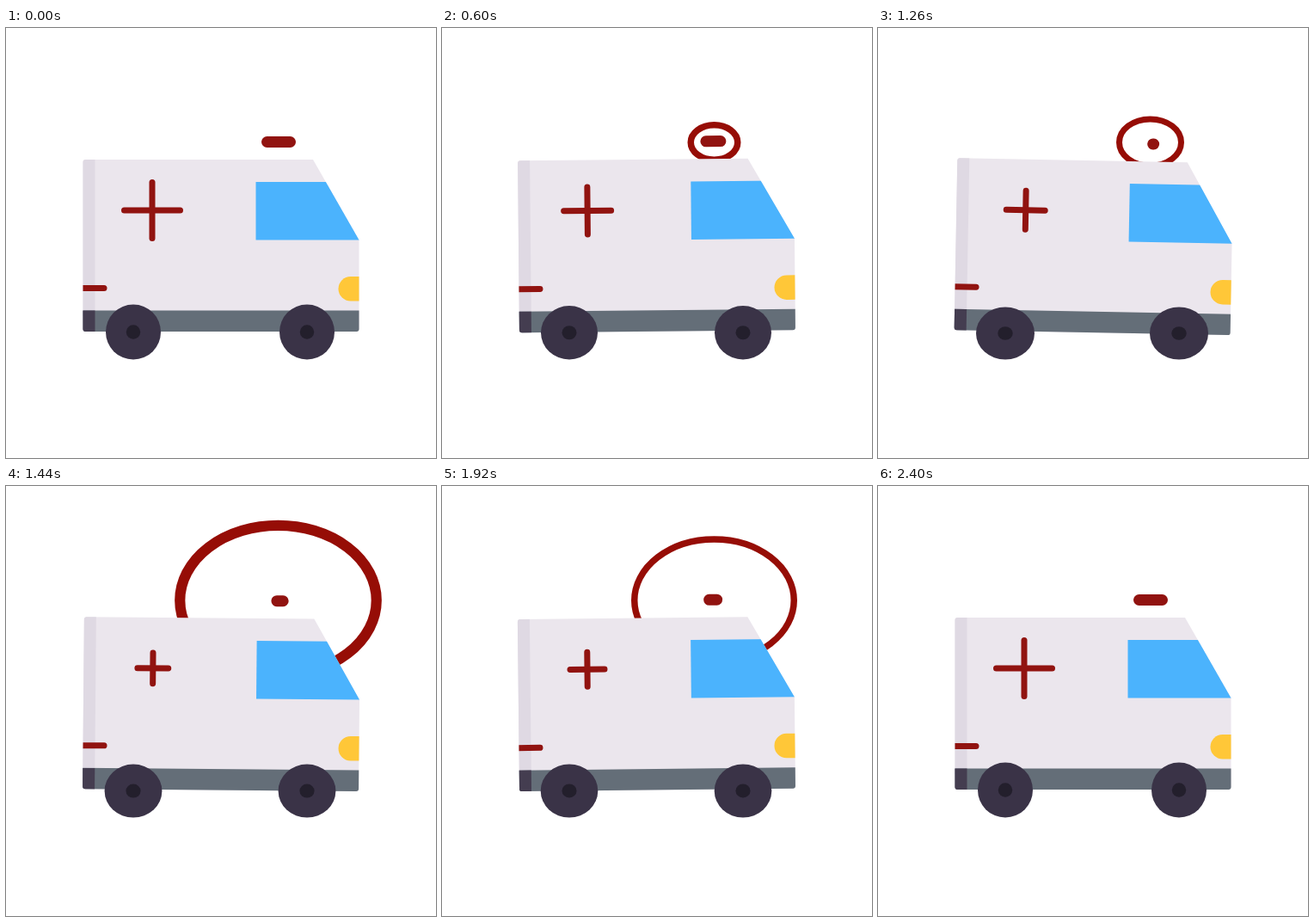
Animation of 500x500 px, one loop 4460 ms. Source, as an HTML page with a canvas:

```html
<!DOCTYPE html>
<html lang="en">
<head>
<meta charset="utf-8">
<title>Ambulance</title>
<style>
html, body { margin: 0; width: 100%; height: 100%; overflow: hidden; background: #fff; }
canvas { display: block; width: 100vw; height: 100vh; }
</style>
</head>
<body>
<canvas id="stage" width="500" height="500"></canvas>
<script>
const ctx = document.getElementById('stage').getContext('2d');
const LOOP = 4460, ACTIVE = 2400, CYCLE = 1200, STEP = 30, SECOND_PULSE = 570;
const RED = '#911310', RING = '#960d06';

// Tracks are [time, value] keys, joined by a smooth curve without overshoot.
const tilt = [[0, 0], [60, 1.05], [180, .35], [270, .6], [390, .75], [450, -.33], [600, -.54], [720, -.62], [900, -.3], [1200, 0]];
const drop = [[0, 0], [60, 1.2], [390, .1], [450, .15], [600, -.2], [720, .4], [1200, 0]];
const squash = [[0, 0], [60, 1], [240, .7], [390, .5], [450, .4], [600, .5], [720, .65], [1200, 0]];
const cross = [[0, 72], [60, 52], [150, 46], [300, 42], [390, 47], [450, 66], [540, 71], [600, 62], [720, 47], [870, 42], [960, 47], [1080, 68], [1200, 72]];
const light = [[0, 40], [60, 14], [390, 28], [450, 30], [540, 36], [600, 30], [720, 22], [960, 28], [1200, 40]];
const ringSize = [[0, 0], [30, 31], [60, 39.5], [150, 96.5], [260, 123], [390, 131.5], [450, 132.5]];
const ringWidth = [[0, 0], [30, 7.5], [60, 7], [150, 7.5], [270, 13], [390, 12.5], [450, 7], [510, 0]];

function slope(keys, i) {
  if (i < 1 || i > keys.length - 2) return 0;
  const rate = j => (keys[j + 1][1] - keys[j][1]) / (keys[j + 1][0] - keys[j][0]);
  const a = rate(i - 1), b = rate(i);
  return a * b <= 0 ? 0 : 2 * a * b / (a + b);
}

function at(keys, t) {
  const last = keys.length - 1;
  if (t >= keys[last][0]) return keys[last][1];
  let i = 0;
  while (t >= keys[i + 1][0]) i++;
  const [t0, v0] = keys[i], [t1, v1] = keys[i + 1];
  const h = t1 - t0, u = (t - t0) / h, w = 1 - u;
  return w * w * ((1 + 2 * u) * v0 + u * h * slope(keys, i)) +
    u * u * ((3 - 2 * u) * v1 - w * h * slope(keys, i + 1));
}

function rect(x, y, w, h, color, radii = 0) {
  ctx.fillStyle = color;
  ctx.beginPath();
  ctx.roundRect(x, y, w, h, radii);
  ctx.fill();
}

function oval(x, y, rx, ry, color) {
  ctx.fillStyle = color;
  ctx.beginPath();
  ctx.ellipse(x, y, rx, ry, 0, 0, 2 * Math.PI);
  ctx.fill();
}

function ring(age) {
  const width = at(ringWidth, age), r = at(ringSize, age);
  if (width < .2) return;
  ctx.strokeStyle = RING;
  ctx.lineWidth = width;
  ctx.beginPath();
  ctx.ellipse(316.5, 133, Math.max(0, r - width / 2), Math.max(0, r * .775 - width / 2), 0, 0, 2 * Math.PI);
  ctx.stroke();
}

function van(t) {
  ctx.save();
  ctx.translate(250, 305 + at(drop, t));
  ctx.rotate(at(tilt, t) * Math.PI / 180);
  ctx.translate(-250, -305);

  const bar = at(light, t);
  rect(317 - bar / 2, 126, bar, 13, RED, Math.min(6.5, bar / 2));

  ctx.save();
  ctx.beginPath();
  ctx.moveTo(93, 153);
  ctx.lineTo(357, 153);
  ctx.lineTo(410.5, 246.5);
  ctx.lineTo(410.5, 350);
  ctx.arcTo(410.5, 353, 407, 353, 3);
  ctx.lineTo(93, 353);
  ctx.arcTo(89.5, 353, 89.5, 350, 3);
  ctx.lineTo(89.5, 156);
  ctx.arcTo(89.5, 153, 93, 153, 3);
  ctx.closePath();
  ctx.clip();
  rect(80, 145, 340, 215, '#ebe6ed');
  rect(80, 145, 23.5, 190, '#dfd9e3');
  rect(80, 328.5, 340, 30, '#646e78');
  rect(80, 328.5, 23.5, 30, '#443d50');
  rect(290.5, 179, 130, 67.5, '#4bb3fd');
  rect(386.5, 289, 40, 28.5, '#ffc738', 14.25);
  rect(80, 299, 37.5, 7, RED, 3.5);
  ctx.restore();

  const arm = at(cross, t);
  rect(170 - arm / 2, 208.5, arm, 7, RED, 3.5);
  rect(166.5, 212 - arm / 2, 7, arm, RED, 3.5);
  ctx.restore();
}

function wheel(x, s) {
  ctx.save();
  ctx.translate(x, 385.5);
  ctx.scale(1 + s * .0625, 1 - s * .047);
  oval(0, -32, 32, 32, '#3a3347');
  oval(0, -32, 8.2, 8.2, '#231f2c');
  ctx.restore();
}

function draw(now) {
  const clock = now % LOOP;
  const t = clock < ACTIVE ? Math.floor(clock / STEP) * STEP % CYCLE : 0;
  ctx.fillStyle = '#fff';
  ctx.fillRect(0, 0, 500, 500);
  ring(t < SECOND_PULSE ? t : t - SECOND_PULSE);
  van(t);
  const s = at(squash, t);
  wheel(148, s);
  wheel(350, s);
}

const start = performance.now();
function tick() {
  draw(performance.now() - start);
  requestAnimationFrame(tick);
}
tick();
</script>
</body>
</html>
```
